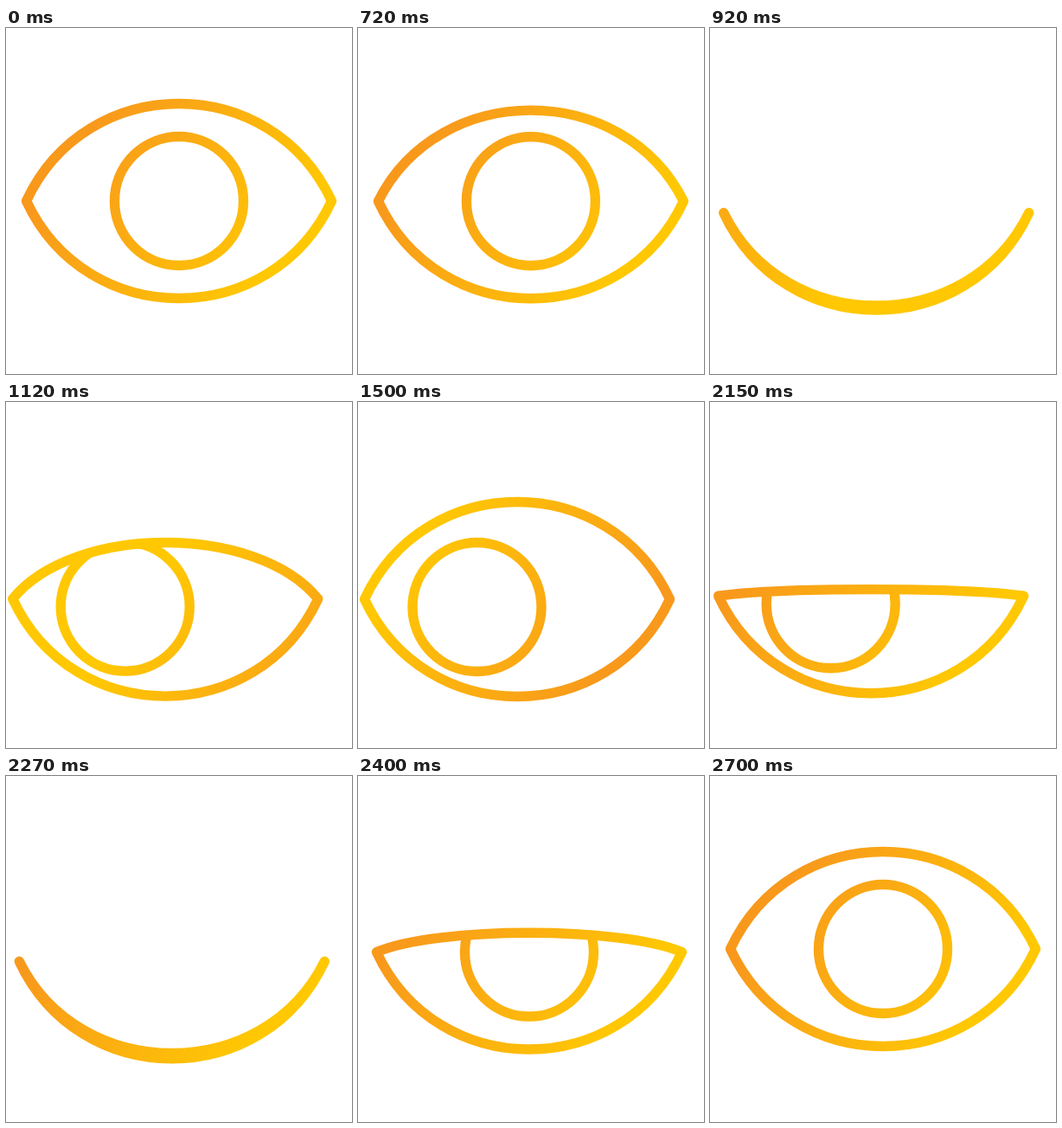
An HTML page with a canvas for the animation above (2720 ms loop, 400 by 400 pixels).

```html
<!DOCTYPE html>
<html lang="en">
<head>
<meta charset="utf-8">
<title>Blinking eye</title>
<style>
  html, body { margin: 0; width: 100%; height: 100%; overflow: hidden; background: #fff; }
  canvas { display: block; width: 400px; height: 400px; }
</style>
</head>
<body>
<canvas id="stage" width="400" height="400"></canvas>
<script>
const ctx = document.getElementById('stage').getContext('2d');

const LOOP = 2720;
const REST_UNTIL = 720;
const BLINKS = [697, 2046];
const CLOSE = 220, OPEN = 435, MOVE = 457, SHADE = 650;

const HALF_WIDTH = 176.5, HEIGHT = 112.5, HANDLE = 69.8;
const LOOK = { x: -16, y: 28 };
const GAZE = { x: -46.5, y: 9 };
const ORANGE = '#f8991c', YELLOW = '#ffc803';
const AXIS = { x: 0.829, y: 0.559 };
const RAMP = 265, PLATEAU = 147, RAMP_END = 410;

const clamp = v => Math.min(1, Math.max(0, v));
const smooth = v => { v = clamp(v); return v * v * (3 - 2 * v); };

// 0 = open, 1 = shut
function lidAt(elapsed) {
  if (elapsed < CLOSE) return smooth(elapsed / CLOSE);
  return (1 - clamp((elapsed - CLOSE) / OPEN)) ** 2.46;
}

// Orange to yellow and back to orange, sliding along the diagonal
function paint(slide) {
  const end = RAMP_END - slide * (RAMP + PLATEAU);
  const from = end - RAMP, to = end + PLATEAU + RAMP;
  const gradient = ctx.createLinearGradient(
    from * AXIS.x, from * AXIS.y, to * AXIS.x, to * AXIS.y);
  gradient.addColorStop(0, ORANGE);
  gradient.addColorStop(RAMP / (to - from), YELLOW);
  gradient.addColorStop((RAMP + PLATEAU) / (to - from), YELLOW);
  gradient.addColorStop(1, ORANGE);
  return gradient;
}

function eyePath(x, y, lidHeight) {
  const left = x - HALF_WIDTH, right = x + HALF_WIDTH;
  const upper = y - lidHeight * 4 / 3, lower = y + HEIGHT * 4 / 3;
  const path = new Path2D();
  path.moveTo(left, y);
  path.bezierCurveTo(left + HANDLE, upper, right - HANDLE, upper, right, y);
  path.bezierCurveTo(right - HANDLE, lower, left + HANDLE, lower, left, y);
  path.closePath();
  return path;
}

function draw(time) {
  const back = time >= BLINKS[1];
  const elapsed = time - BLINKS[back ? 1 : 0];
  const toward = v => back ? 1 - v : v;

  const move = toward(smooth(elapsed / MOVE));
  const gaze = toward(smooth((elapsed - 105) / 240));
  const slide = back ? 0 : smooth(elapsed / SHADE);
  const x = 200 + LOOK.x * move, y = 200 + LOOK.y * move;
  const eye = eyePath(x, y, HEIGHT * (1 - 2 * lidAt(elapsed)));

  ctx.clearRect(0, 0, 400, 400);
  ctx.strokeStyle = paint(slide);
  ctx.lineWidth = 11.4;
  ctx.lineJoin = 'round';

  ctx.save();
  ctx.clip(eye);
  ctx.beginPath();
  ctx.arc(x + GAZE.x * gaze, y + GAZE.y * gaze, 74.5, 0, 2 * Math.PI);
  ctx.stroke();
  ctx.restore();
  ctx.stroke(eye);
}

const start = performance.now();
function tick() {
  const clock = (performance.now() - start) % LOOP;
  draw(clock < REST_UNTIL ? 0 : clock);
  requestAnimationFrame(tick);
}
tick();
</script>
</body>
</html>
```
